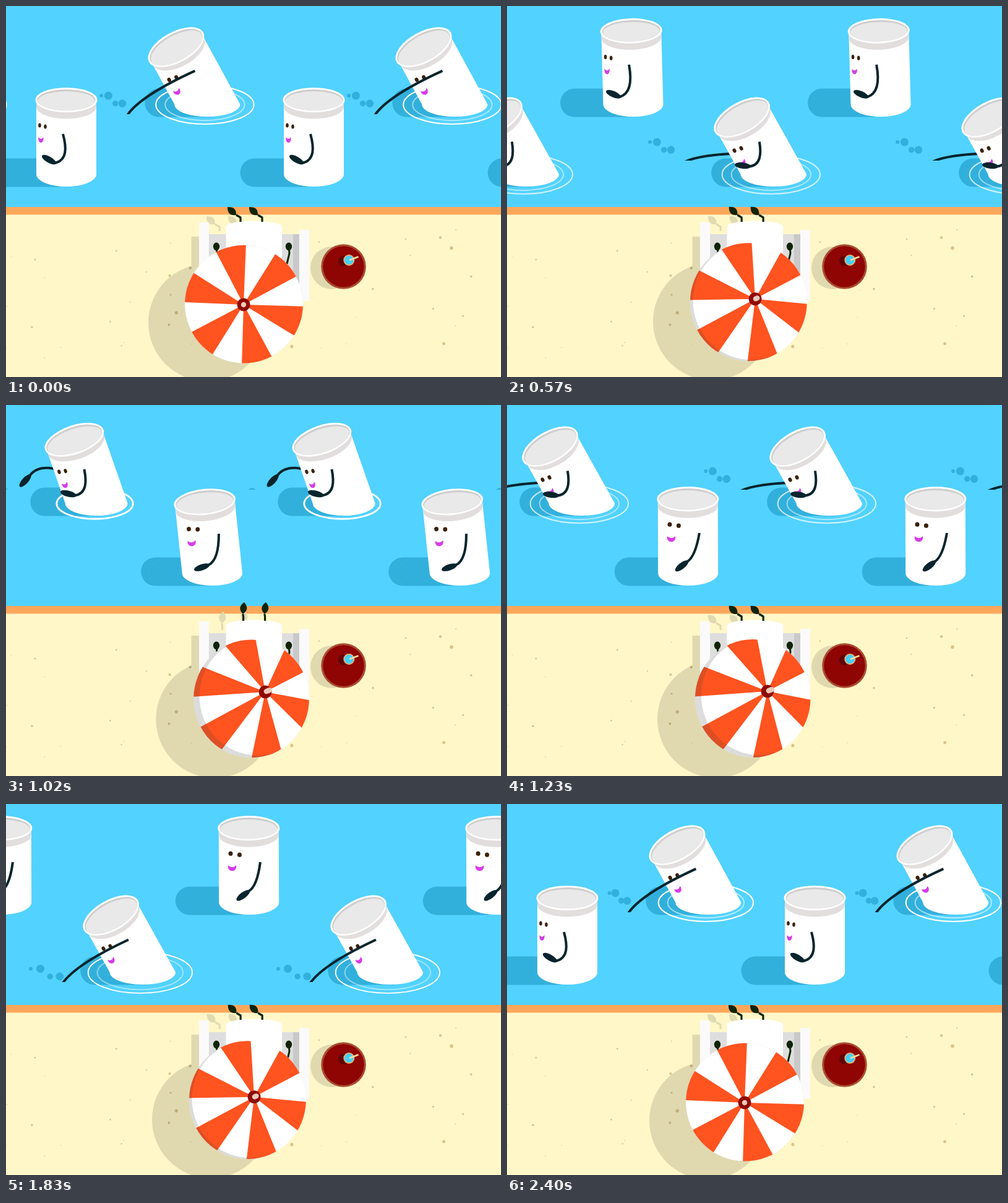
An HTML page with a canvas that plays this animation: 800x600 px, repeating every 2430 ms.

```html
<!DOCTYPE html>
<html>
<head>
<meta charset="utf-8">
<title>Beach day</title>
<style>
html, body { margin: 0; width: 100%; height: 100%; overflow: hidden; }
canvas { display: block; }
</style>
</head>
<body>
<canvas id="stage" width="800" height="600"></canvas>
<script>
const g = document.getElementById('stage').getContext('2d');
const LOOP = 2430, CYCLE = 2400, HALF = 1200, STEP = 30, TAU = Math.PI * 2;
const INK = '#08242d', LEAF = '#0f2406', WATER_SHADE = '#32b0dc', SHADE = 'rgba(0,0,0,.12)';

const mod = (a, n) => ((a % n) + n) % n;
const clamp = v => Math.max(0, Math.min(1, v));
const mix = (a, b, k) => a + (b - a) * k;
const rad = deg => deg * Math.PI / 180;
const swing = (t, period) => (1 - Math.cos(TAU * t / period)) / 2;

// Eases between poses, each written as [time, ...values]
function pose(keys, time) {
  let i = 1;
  while (i < keys.length - 1 && keys[i][0] < time) i++;
  const a = keys[i - 1], b = keys[i], k = clamp((time - a[0]) / (b[0] - a[0]));
  return a.slice(1).map((v, j) => mix(v, b[j + 1], k * k * (3 - 2 * k)));
}

function oval(x, y, rx, ry, color, turn = 0) {
  g.fillStyle = color;
  g.beginPath();
  g.ellipse(x, y, rx, ry, turn, 0, TAU);
  g.fill();
}
const disc = (x, y, r, color) => oval(x, y, r, r, color);

function box(x, y, w, h, color) {
  g.fillStyle = color;
  g.fillRect(x, y, w, h);
}

function line(points, width, color, cap = 'butt') {
  g.strokeStyle = color;
  g.lineWidth = width;
  g.lineCap = cap;
  g.lineJoin = 'round';
  g.beginPath();
  points.forEach(([x, y]) => g.lineTo(x, y));
  g.stroke();
}

function aboveWater(y, draw) {
  g.save();
  g.beginPath();
  g.rect(-900, -100, 2400, y + 100);
  g.clip();
  draw();
  g.restore();
}

// Wrist x, y from the shoulder, hand angle, bend of the elbow
const NEAR_ARM = [
  [0, -13, 47, -30, 18],
  [570, -16, 40, -7, 16],
  [900, -16, 53, 8, 13],
  [1200, -19, 47, 38, 8],
  [1560, -65, 20, 48, -20],
  [1740, -112, 76, 57, -14],
  [1830, -110, 76, 57, -14],
  [2250, -16, 55, -20, 16],
  [2400, -13, 47, -30, 18]
];
const FAR_ARM = [
  [200, -10, 5, 40, 0],
  [360, -72, 0, 48, -20],
  [570, -98, 17, 40, -9],
  [900, -62, 39, 50, -9],
  [1100, -10, 30, 40, 0]
];

function arm(sx, sy, [x, y, angle, bend], waterline) {
  const n = bend / Math.hypot(x, y), a = rad(angle);
  aboveWater(waterline, () => {
    g.translate(sx, sy);
    g.strokeStyle = INK;
    g.lineWidth = 4;
    g.lineCap = 'butt';
    g.beginPath();
    g.moveTo(0, 0);
    g.bezierCurveTo(.4 * x + .65 * n * y, .4 * y - .65 * n * x, .8 * x + n * y, .8 * y - n * x, x, y);
    g.stroke();
    oval(x - 11 * Math.cos(a), y + 11 * Math.sin(a), 13, 5, INK, -a);
  });
}

function ripple(x, y, age, alpha, lineWidth) {
  const rx = 60 + age / 12;
  if (age < 0 || alpha <= 0) return;
  g.strokeStyle = `rgba(255,255,255,${alpha})`;
  g.lineWidth = lineWidth;
  g.beginPath();
  g.ellipse(x, y, rx, rx * .385 + 1, 0, 0, TAU);
  g.stroke();
}

function splash(x, y, waterline, age) {
  if (age < 0 || age > 340) return;
  const cx = x - .295 * age, cy = y - .39 * age + .0011 * age * age;
  const spread = 14 + .00045 * age * age;
  aboveWater(waterline, () => [3, 6.5, 4.7, 6.3].forEach((r, i) =>
    disc(cx + (i / 3 - .5) * spread, cy + (i < 2 ? -6.5 : 6), r, WATER_SHADE)));
}

function swimmer(p, waterTime, dx, base) {
  const lean = swing(p, HALF), turn = Math.cos(TAU * p / CYCLE);
  const angle = rad(29.3 * lean), sin = Math.sin(angle), cos = Math.cos(angle);
  const drift = 97.5 + dx - p / 6, x = drift + 28.5 * lean;
  const height = 120 - 15 * lean * (1.4 - .4 * lean);
  const lx = x - height * sin, ly = base - height * cos;
  const w = 48.5 - 2 * lean * lean, rx = w / cos, b = 20 + 5 * lean;

  // The far arm strokes in the first half, the near arm in the second
  const far = waterTime < HALF, h = waterTime % HALF;
  const farWater = base - 22, nearWater = base + 16;
  splash(dx - (far ? 90 : 257), (far ? farWater : nearWater) + 10, far ? farWater : nearWater, h - 360);

  g.fillStyle = WATER_SHADE;
  g.beginPath();
  g.roundRect(drift - 119 + 47 * lean, base - 25.5, 130, 46, 23);
  g.fill();

  const rippleX = drift + 24.5 * lean;
  ripple(rippleX, base + .5, h - 340, clamp((860 - h) / (far ? 400 : 230)), 1.9 + clamp((600 - h) / 240));
  ripple(rippleX, base + .5, h - 520, .6 * clamp((1030 - h) / 530), 1.9);

  if (p > 200 && p < 1100) arm(lx, ly + 58, pose(FAR_ARM, p), farWater);

  g.fillStyle = '#fff';
  g.beginPath();
  g.moveTo(lx - w * cos, ly + w * sin);
  g.lineTo(x - rx, base);
  g.ellipse(x, base, rx, 20, 0, Math.PI, 0, true);
  g.lineTo(lx + w * cos, ly - w * sin);
  g.fill();

  g.save();
  g.translate(lx, ly);
  g.rotate(-angle);
  const band = 11 - 3 * lean;
  box(-w, 0, 2 * w, band, '#e2dede');
  oval(0, band, w, b - .5, '#e2dede');
  oval(0, 0, 50, b, '#fff');
  oval(0, 0, 47, b - 3, '#cfcdcd');
  oval(0, 1.5, 46, b - 4.5, '#e9e9e9');

  const eye = 2.9 - .6 * turn, m = 5.3 - 1.3 * turn;
  oval(-36.2 - 6.8 * turn, 41, eye, 3.6, '#3b2108');
  oval(-24.5 - 9.5 * turn, 43, eye, 3.6, '#3b2108');
  g.translate(-34 - 7 * turn, 65);
  g.fillStyle = '#d63be8';
  g.beginPath();
  g.moveTo(-m, -5);
  g.quadraticCurveTo(0, 1, m, -5);
  g.bezierCurveTo(m * 1.3, 7, -m * 1.3, 7, -m, -5);
  g.fill();
  g.restore();

  const u = 6.5 - 12 * turn, v = 55 - 7 * lean;
  arm(lx + u * cos + v * sin, ly - u * sin + v * cos, pose(NEAR_ARM, p), nearWater);
}

function sea(t) {
  box(0, 0, 800, 326, '#52d2ff');
  for (const [dx, base, lag] of [[90, 159, 660], [0, 272, 0]]) {
    const p = mod(Math.min(t, CYCLE) - lag, CYCLE);
    for (let k = 0; k < 4; k++) {
      g.save();
      g.translate(k * 400, 0);
      swimmer(p, mod(t - lag, LOOP), dx, base);
      g.restore();
    }
  }
}

function grains() {
  let seed = 7;
  const random = () => (seed = seed * 16807 % 2147483647) / 2147483647;
  for (let i = 0; i < 48; i++)
    disc(random() * 800, 350 + random() * 220, .7 + 2.3 * random() ** 2, '#dcc48c');
}

function foot(x, y, k, color) {
  const a = rad(mix(-138, -55, k)), bx = x + mix(-7, 9.5, k), by = y - 10;
  line([[x + 7 * k, y + 1], [x + 7 * k, y - 6], [bx, by]], 3.2, color);
  g.save();
  g.translate(bx, by);
  g.rotate(a);
  g.fillStyle = color;
  g.beginPath();
  g.moveTo(0, 0);
  g.quadraticCurveTo(9, 11, 19, 0);
  g.quadraticCurveTo(9, -11, 0, 0);
  g.fill();
  g.restore();
}

function hand(x, lean) {
  line([[x, 388], [x + 1, 400], [x + lean, 417]], 3, LEAF);
  oval(x, 389, 5.2, 6.5, LEAF);
}

function umbrella(q) {
  const hx = 384 + 37 * q, hy = 483 - 20 * q;
  const cx = 384.5 + 12.75 * q, cy = 482.3 - 7.8 * q, rx = 95.5 - 2.2 * q, ry = 95.5;
  oval(cx, cy, rx, ry, '#fff');

  g.save();
  g.beginPath();
  g.ellipse(cx, cy, rx, ry, 0, 0, TAU);
  g.clip();
  // Seams run from the hub through the rim and are cut by the outline
  const seam = deg => g.lineTo(
    hx + 1.3 * (cx + 4 * q + ry * Math.cos(rad(deg)) - hx),
    hy + 1.3 * (cy + ry * Math.sin(rad(deg)) - hy));
  g.fillStyle = '#ff5320';
  for (let deg = 2; deg < 360; deg += 60) {
    g.beginPath();
    g.moveTo(hx, hy);
    seam(deg);
    seam(deg + 30);
    g.fill();
  }
  // Shaded rim on the far side of the dome
  g.fillStyle = 'rgba(60,60,60,.18)';
  g.beginPath();
  g.rect(250, 350, 300, 250);
  g.ellipse(cx + 10 * q, cy - 4 * q, rx, ry, 0, 0, TAU);
  g.fill('evenodd');
  g.restore();

  disc(hx, hy, 10.5, '#8e0a05');
  line([[hx + 2 * q, hy - q], [hx + 7 * q + .01, hy - 3 * q]], 8.5, '#edc9b8', 'round');
}

function beach(t) {
  const tilt = swing(t, CYCLE), kick = swing(t, 600), feet = [379, 414];

  box(0, 337, 800, 263, '#fff7c8');
  box(0, 325, 800, 12.5, '#fba75b');
  grains();

  g.fillStyle = SHADE;
  g.beginPath();
  g.rect(299.5, 373, 60, 100);
  g.ellipse(325 + 13 * tilt, 512 - 4 * tilt, 95, 95, 0, 0, TAU);
  g.fill();
  for (const x of feet) foot(x - 34, 363, kick, '#e1dbb2');

  // Chair
  box(328, 369, 146, 110, '#dedede');
  box(464, 369, 10, 110, '#c9c9c9');
  box(312, 350, 16, 127, '#fafafa');
  box(474, 362, 16, 115, '#fafafa');

  // Sunbather
  box(355.5, 357, 90.5, 110, '#fff');
  oval(400.7, 357, 45.2, 9.5, '#fff');
  for (const x of feet) foot(x, 348, kick, LEAF);
  hand(340, 5);
  hand(457, -3);

  // Table and drink
  disc(526.5, 423.5, 34.5, SHADE);
  disc(545.5, 421.5, 36.3, '#aa4c31');
  disc(545.5, 421.5, 33.3, '#8e0503');
  disc(545.5, 412.5, 8.5, '#5f0503');
  disc(554.3, 411, 9, '#e8b36a');
  disc(554.3, 411, 7.2, '#45cfff');
  line([[555, 411], [569.5, 405.5]], 2.5, '#f5dfa0');

  umbrella(tilt);
}

function frame(now) {
  const t = Math.floor((now % LOOP) / STEP) * STEP;
  sea(t);
  beach(t);
  requestAnimationFrame(frame);
}
requestAnimationFrame(frame);
</script>
</body>
</html>
```
